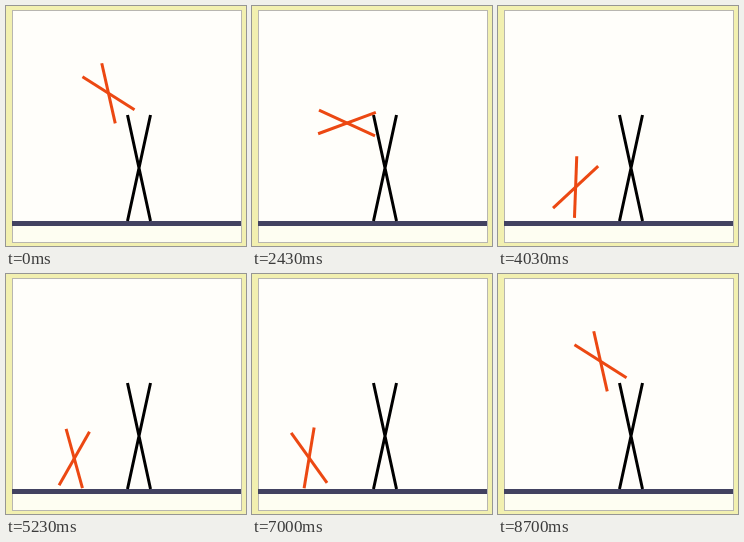
Recreate the animation shown at these times as an HTML page. Size 240 by 240 pixels, loop 8.73 s.

```html
<!DOCTYPE html>
<html lang="en">
<head>
<meta charset="utf-8">
<title>Falling cross</title>
<style>
  html, body { margin: 0; width: 100%; height: 100%; overflow: hidden; background: #f2f0b0; }
  svg { display: block; width: 100vw; height: 100vh; }
</style>
</head>
<body>
<svg viewBox="0 0 240 240">
  <rect width="240" height="240" fill="#f2f0b0"/>
  <rect x="6.5" y="4.5" width="229" height="232" fill="#fffefa" stroke="#b8b6b0"/>
  <rect x="7" y="220" width="228" height="16" fill="#fefef2"/>
  <rect x="6" y="215" width="229" height="5" fill="#424260"/>
  <path d="M121.5 109L144.5 215M144.5 109L121.5 215" stroke="#000" stroke-width="3"/>
  <g id="cross" stroke="#ec4812" stroke-width="3">
    <path d="M-30.8 0H30.8" transform="rotate(-22.5)"/>
    <path d="M-30.8 0H30.8" transform="rotate(22.5)"/>
  </g>
</svg>
<script>
  const LOOP = 8.73, RESET = 8.7;
  const G = 38;        // gravity, px/s²
  const K = 0.97;      // tipping rate about a foot, 1/s
  const HALF = 22.5;   // half the angle between the bars
  const LEG = 30.2, FLOOR = 213.6;
  const cross = document.getElementById('cross');

  const fly = (x, y, a, vx, vy, spin, t) =>
    [x + vx * t, y + vy * t + G * t * t / 2, a + spin * t];

  // Stand on one foot at footX; side picks the bar that carries the weight.
  function stand(footX, a, side) {
    const r = (a + side * HALF) * Math.PI / 180;
    return [footX + LEG * Math.cos(r), FLOOR + LEG * Math.sin(r), a];
  }

  function pose(t) {
    if (t < 0.87 || t >= RESET) return [102.5, 87.3, 54.85];
    if (t < 1.57) return fly(102.5, 87.3, 54.85, 0, 0, 0, t - 0.87);
    if (t < 2.43) return fly(102.5, 96.6, 54.85, -8.7, 7.5, -61.3, t - 1.57);
    if (t < 3.5) return fly(95, 117, 2.15, -11.7, 40, -57, t - 2.43);
    if (t < 4.3) return fly(82.5, 183.7, -59, -9.2, -15, -12, t - 3.5);
    if (t < 5.58) {
      const s = K * (t - 4.3);
      const lean = 1.1 * Math.cosh(s) + 13.4 * Math.sinh(s);
      return stand(76.3, -90 + HALF - Math.min(lean, HALF), -1);
    }
    const lean = 9.2 * Math.cosh(K * (t - 7.2));
    return stand(52.2, -90 - HALF + Math.min(lean, HALF), 1);
  }

  function draw(now) {
    const [x, y, a] = pose(now / 1000 % LOOP);
    cross.setAttribute('transform', `translate(${x} ${y}) rotate(${a})`);
    requestAnimationFrame(draw);
  }
  draw(0);
</script>
</body>
</html>
```
